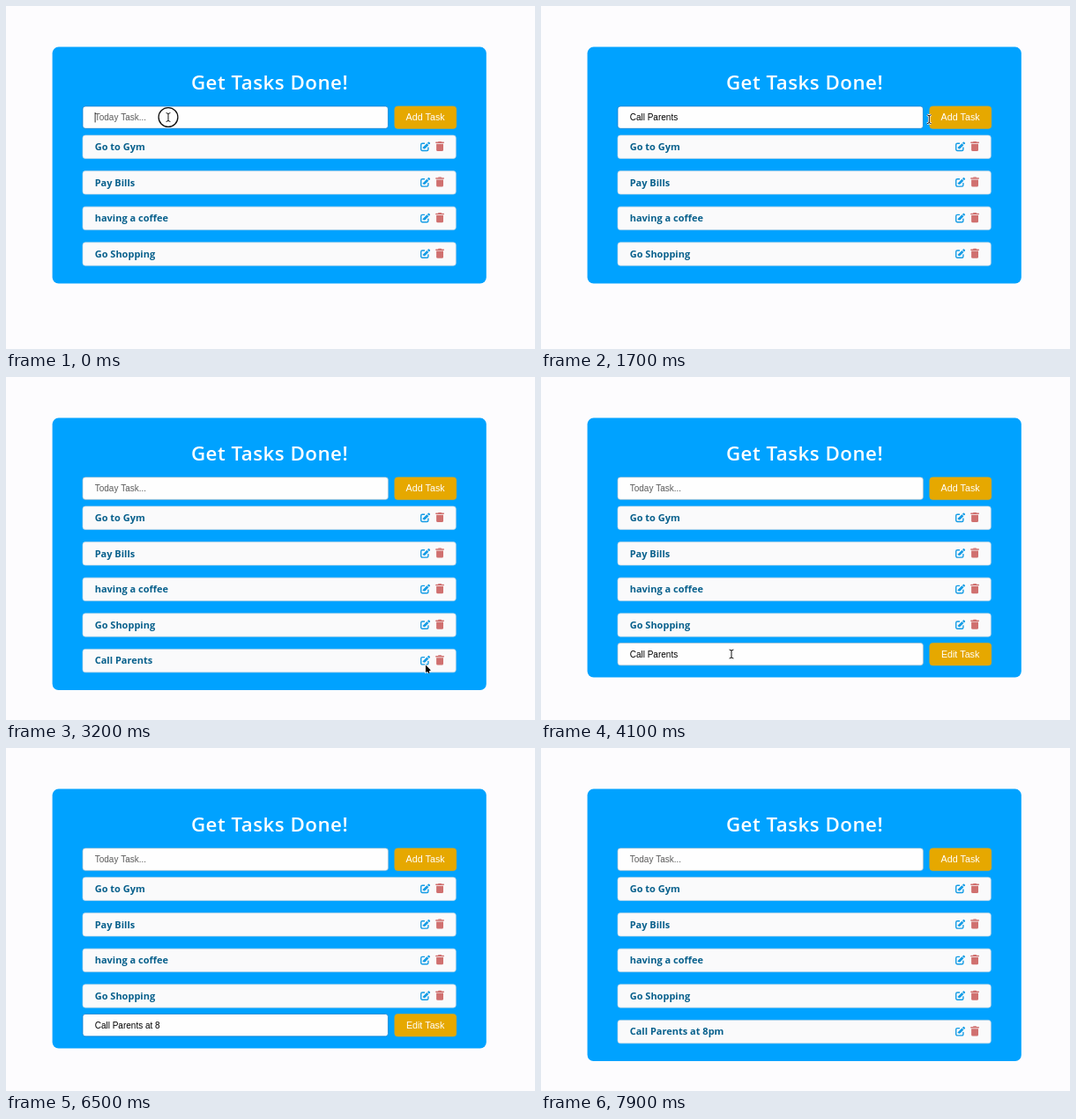
Write an HTML page with a canvas that moves like this. It is 600 px wide and 390 px high and loops after 8000 ms.

```html
<!DOCTYPE html>
<html lang="en">
<head>
<meta charset="utf-8">
<title>Task list</title>
<style>
html, body { margin: 0; width: 100%; height: 100%; overflow: hidden; background: #fdfcfe; }
canvas { display: block; width: 600px; height: 390px; }
</style>
</head>
<body>
<canvas id="stage"></canvas>
<script>
const LOOP = 8000, STEP = 100;
const W = 600, H = 390;
const BODY = '"Open Sans", "Noto Sans", sans-serif';
const FORM = '"Liberation Sans", Arial, sans-serif';
const PAPER = '#fafafb', INK = '#08608c';
const PEN = '#159ce5', BIN = '#d0706f';

// Layout
const LEFT = 87, TOP = 114, ROW_TOP = 147, ROW_GAP = 40.6;

// Timeline in ms
const TYPE = 200, TYPED = 1300, ADD = 2100, EDIT = 3400;
const FOCUS = 4300, RETYPE = 4800, SAVE = 7100;
const clicks = [0, 2000, 3300, FOCUS];

const tasks = ['Go to Gym', 'Pay Bills', 'having a coffee', 'Go Shopping'];
const newTask = 'Call Parents';
const suffix = ' at 8pm';

// Mouse rests, eased between
const stops = [
  { from: 0, to: TYPED, x: 184, y: 126.5 },
  { from: 1800, to: 2300, x: 470, y: 129 },
  { from: 2900, to: 2900, x: 480, y: 351 },
  { from: 3200, to: 3500, x: 476, y: 327.5 },
  { from: 4000, to: RETYPE, x: 216, y: 315 }
];

const canvas = document.getElementById('stage');
const ctx = canvas.getContext('2d');
const dpr = window.devicePixelRatio || 1;
canvas.width = W * dpr;
canvas.height = H * dpr;

function box(x, y, w, h, r, fill, stroke, width = 0.7) {
  ctx.beginPath();
  ctx.roundRect(x, y, w, h, r);
  if (fill) {
    ctx.fillStyle = fill;
    ctx.fill();
  }
  if (stroke) {
    ctx.strokeStyle = stroke;
    ctx.lineWidth = width;
    ctx.stroke();
  }
}

function label(str, x, y, font, color, align = 'left') {
  ctx.font = font;
  ctx.fillStyle = color;
  ctx.textAlign = align;
  ctx.fillText(str, x, y);
}

function at(x, y, paint) {
  ctx.save();
  ctx.translate(x, y);
  paint();
  ctx.restore();
}

function editIcon() {
  box(0.7, 2, 8.2, 8.3, 1.5, null, PEN, 1.4);
  box(5, 0, 6, 6.3, 0, PAPER);
  ctx.translate(3.4, 7.9);
  ctx.rotate(-Math.PI / 4);
  box(0, -1.4, 7, 2.8, [0, 0, 0, 2], PEN);
  box(7.7, -1.4, 2.2, 2.8, 0.8, PEN);
}

function trashIcon() {
  box(2.9, 0, 3.9, 1.2, 0.5, BIN);
  box(0, 0.7, 9.7, 1.5, 0.5, BIN);
  box(0.9, 2.9, 7.9, 8.2, [0, 0, 1.5, 1.5], BIN);
}

function row(i, str) {
  const y = ROW_TOP + i * ROW_GAP;
  box(LEFT, y, 423.3, 26.4, 3, PAPER, '#b9d3e2');
  label(str, 100.7, y + 17, 'bold 11px ' + BODY, INK);
  at(470, y + 7.2, editIcon);
  at(487.2, y + 6.9, trashIcon);
}

function form(y, value, button, focused, caret) {
  const border = focused ? '#0a78c8' : '#a9bfcc';
  box(LEFT, y, 346.4, 25.3, 3, '#fefefe', border);
  label(value || 'Today Task...', 100.7, y + 16.2, '10px ' + FORM, value ? '#000' : '#5c5c5c');
  if (caret) {
    const x = 100.7 + (value ? ctx.measureText(value).width : 0);
    ctx.fillStyle = '#000';
    ctx.fillRect(x, y + 7, 0.8, 11.4);
  }
  box(440.8, y, 70, 25.4, 3.5, '#e6a800', '#c9a72d');
  label(button, 475.6, y + 16.3, '10.7px ' + FORM, '#fff', 'center');
}

// Keys are spread evenly from one time to the next
function typed(str, t, from, to) {
  const n = Math.floor((t - from) / (to - from) * str.length) + 1;
  return str.slice(0, Math.max(0, n));
}

function mouseAt(t) {
  const i = stops.findLastIndex(s => s.from <= t);
  const a = stops[i], b = stops[i + 1] || a;
  if (t <= a.to || a === b) return [a.x, a.y];
  const p = (t - a.to) / (b.from - a.to);
  const e = p * p * (3 - 2 * p);
  return [a.x + (b.x - a.x) * e, a.y + (b.y - a.y) * e];
}

function beam() {
  for (const [color, width] of [['#fff', 2.6], ['#111', 1]]) {
    ctx.beginPath();
    ctx.moveTo(0, -4.2);
    ctx.lineTo(0, 4.2);
    for (const side of [-1, 1]) {
      for (const end of [-1, 1]) {
        ctx.moveTo(0, 4 * end);
        ctx.lineTo(2.4 * side, 5 * end);
      }
    }
    ctx.strokeStyle = color;
    ctx.lineWidth = width;
    ctx.stroke();
  }
}

function arrow() {
  for (const [color, grow] of [['#fff', 1.6], ['#000', 0]]) {
    ctx.beginPath();
    ctx.moveTo(0, 0);
    ctx.lineTo(0, 8.3);
    ctx.lineTo(5.8, 6);
    ctx.closePath();
    ctx.fillStyle = ctx.strokeStyle = color;
    ctx.lineWidth = grow || 0.1;
    ctx.fill();
    ctx.stroke();
    ctx.beginPath();
    ctx.moveTo(2, 5);
    ctx.lineTo(3.9, 9.2);
    ctx.lineWidth = 1.6 + grow;
    ctx.stroke();
  }
}

function mouse(t, editing) {
  if ((t >= TYPE && t < TYPED) || t >= RETYPE) return;
  const [x, y] = mouseAt(t);
  if (clicks.some(c => t >= c && t < c + 200)) {
    box(x - 10.9, y - 10.9, 21.8, 21.8, 10.9, 'rgba(255,255,255,.35)', '#111', 1.3);
  }
  const inField = top => x < 442 && y > top && y < top + 26;
  const overText = inField(TOP) || (editing && inField(302));
  at(x, y, overText ? beam : arrow);
}

function draw(t) {
  const editing = t >= EDIT && t < SAVE;
  const bottom = t < ADD ? 315.5 : editing ? 341.5 : 356;
  const blink = t % 1000 < 500;

  ctx.setTransform(dpr, 0, 0, dpr, 0, 0);
  ctx.fillStyle = '#fdfcfe';
  ctx.fillRect(0, 0, W, H);
  box(52.6, 46.6, 492.2, bottom - 46.6, 7, '#00a2ff');

  ctx.letterSpacing = '0.5px';
  label('Get Tasks Done!', 299, 94.8, '600 22.3px ' + BODY, '#fff', 'center');
  ctx.letterSpacing = '0px';

  const value = t < ADD ? typed(newTask, t, TYPE, TYPED) : '';
  form(TOP, value, 'Add Task', t < ADD, t < 2000 && blink);
  tasks.forEach((name, i) => row(i, name));

  if (editing) {
    const text = newTask + typed(suffix, t, RETYPE, SAVE + 100);
    form(302.5, text, 'Edit Task', t >= FOCUS, t >= FOCUS && blink);
  } else if (t >= ADD) {
    row(tasks.length, t >= SAVE ? newTask + suffix : newTask);
  }
  mouse(t, editing);
}

const start = performance.now();
function tick() {
  const t = (performance.now() - start) % LOOP;
  draw(Math.floor(t / STEP) * STEP);
  requestAnimationFrame(tick);
}
tick();
</script>
</body>
</html>
```
